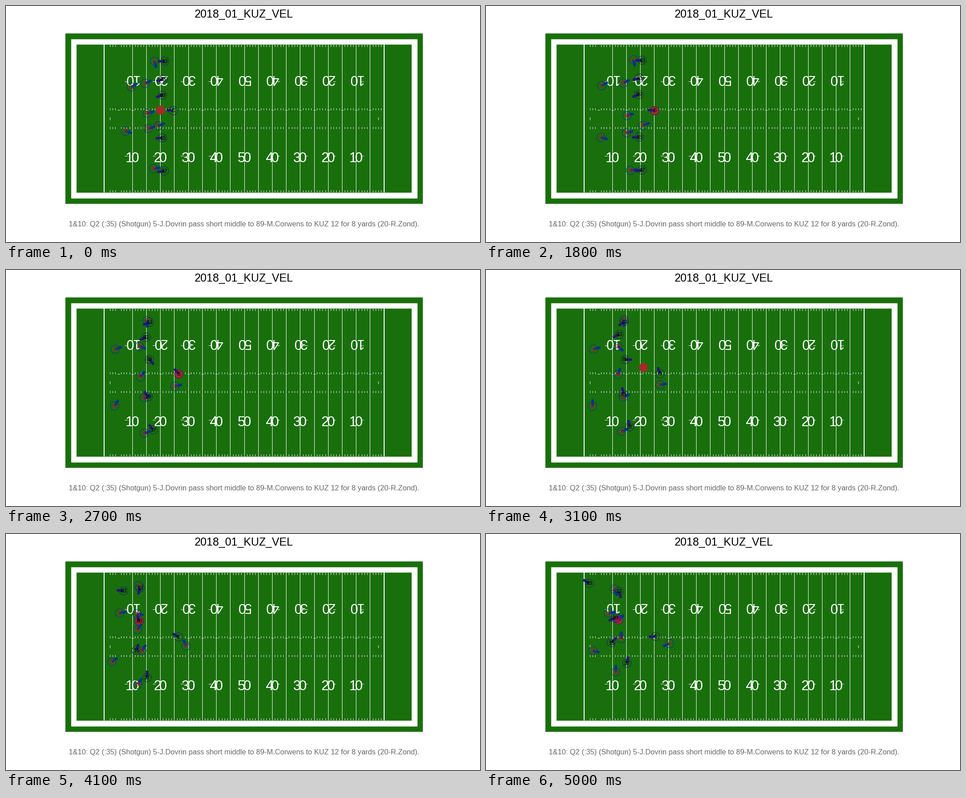
Recreate the animation shown at these times as a matplotlib script. Size 1058 by 529 pixels, loop 5.1 s.

```python
import matplotlib.pyplot as plt
import numpy as np
from matplotlib.animation import FuncAnimation
from matplotlib.patches import Circle, Rectangle

W, H, DPI = 1058, 529, 100
FRAMES, INTERVAL = 51, 100
TURF, BALL_COLOR = "#196f0c", "#a52a2a"
BAR_LENGTH = 15.5

# Phases of the play, in frames.
SNAP, IN_HAND, DROP, THROW, IN_AIR, CATCH, DOWN, END = 8, 16, 18, 28, 31, 35, 44, 50

# The offense holds still until the snap; the defense shifts from the start.
OFFENSE = dict(team="#241773", ink="black", start=SNAP + 2)
DEFENSE = dict(team="#00338d", ink="#c60c30", start=0)

plt.rcParams["font.family"] = "Liberation Sans"
fig = plt.figure(figsize=(W / DPI, H / DPI), dpi=DPI, facecolor="white")
ax = fig.add_axes([0, 0, 1, 1])
ax.set(xlim=(0, W), ylim=(H, 0))
ax.axis("off")


def px(size):
    return size * 72 / DPI


def yard_x(yard):
    return 219.4 + 6.242 * yard


def box(left, top, right, bottom, color):
    ax.add_patch(Rectangle((left + 0.5, top + 0.5), right - left, bottom - top,
                           color=color, lw=0, zorder=1, snap=False))


def line(x0, y0, x1, y1, width=1):
    ax.plot([x0, x1], [y0, y1], color="white", lw=px(width),
            solid_capstyle="butt", zorder=2)


def label(x, y, text, size, color, **options):
    options = dict(ha="center", va="baseline") | options
    return ax.text(x, y, text, fontsize=px(size), color=color, **options)


def draw_field():
    box(132, 61, 930, 443, TURF)
    box(145, 74, 918, 431, "white")
    box(157, 86, 905, 418, TURF)
    for yard in (0, 100):
        line(yard_x(yard), 86, yard_x(yard), 418, 2)
    for yard in range(10, 100, 5):
        line(yard_x(yard), 86, yard_x(yard), 418)
    for yard in range(5, 100, 5):
        line(yard_x(yard) - 2, 233, yard_x(yard) + 3, 233)
    for yard in range(2, 100):
        if yard % 5:
            for top in (87, 229, 271, 413):
                line(yard_x(yard), top, yard_x(yard), top + 4)
    for yard in (2, 98):
        line(yard_x(yard), 249, yard_x(yard), 255)
    for yard in range(10, 100, 10):
        draw_yard_number(yard)


def draw_yard_number(yard):
    x = yard_x(yard)
    tens = str(min(yard, 100 - yard) // 10)
    for baseline, dash_y, flip in ((350, 336, 1), (155, 169, -1)):
        for digit, shift in ((tens, -6.5), ("0", 6.5)):
            label(x + flip * shift, baseline, digit, 31, "white", zorder=3,
                  rotation=90 - 90 * flip, rotation_mode="anchor")
        if yard != 50:
            side = -1 if yard < 50 else 1
            line(x + side * 17, dash_y, x + side * 11, dash_y)


def glide(t, times, points):
    """Smooth curve through the points, starting from rest."""
    t = max(t, times[0])
    slopes = np.gradient(points, times, axis=0)
    slopes[0] = 0
    i = min(np.searchsorted(times, t, side="right"), len(times) - 1) - 1
    span = times[i + 1] - times[i]
    u = (t - times[i]) / span
    ease = u * u * (3 - 2 * u)
    return (points[i] * (1 - ease) + points[i + 1] * ease
            + span * u * (1 - u) * (slopes[i] * (1 - u) - slopes[i + 1] * u))


class Player:
    """Runs a route and turns from its set stance to two later headings."""

    def __init__(self, number, side, route, headings):
        self.times = np.array([side["start"], DROP, IN_AIR, END])
        self.route = np.array(route, float) + 0.5
        self.headings = headings
        self.ring = ax.add_patch(Circle((0, 0), 9.5, fill=False, zorder=5,
                                        ec=side["team"], lw=px(1)))
        self.bar, = ax.plot([], [], color=side["team"], lw=px(5.5),
                            solid_capstyle="butt", zorder=6)
        self.number = label(0, 0, number, 12.5, side["ink"], va="center", zorder=7)

    def position(self, t):
        return glide(t, self.times, self.route)

    def move(self, t):
        x, y = self.position(t)
        angle = np.radians(np.interp(t, (DROP, IN_AIR, END), self.headings))
        self.ring.center = x, y
        self.bar.set_data([x, x + BAR_LENGTH * np.cos(angle)],
                          [y, y - BAR_LENGTH * np.sin(angle)])
        self.number.set_position((x, y + 1))


class Ball:
    """Snapped to the passer, thrown to the receiver, then carried until down."""

    spot = np.array([344.5, 233.5])

    def __init__(self, passer, receiver):
        self.passer, self.receiver = passer, receiver
        self.dot = ax.add_patch(Circle(self.spot, 10, color=BALL_COLOR, lw=0, zorder=4))

    @staticmethod
    def fly(t, start, end, origin, goal):
        return origin + (goal - origin) * np.clip((t - start) / (end - start), 0, 1)

    def move(self, t):
        if t < THROW:
            self.dot.center = self.fly(t, SNAP, IN_HAND, self.spot,
                                       self.passer.position(t))
        else:
            self.dot.center = self.fly(t, THROW, CATCH, self.passer.position(THROW),
                                       self.receiver.position(np.clip(t, CATCH, DOWN)))


draw_field()
label(531, 26, "2018_01_KUZ_VEL", 24.7, "black")
label(531, 494, "1&10: Q2 (:35) (Shotgun) 5-J.Dovrin pass short middle to "
      "89-M.Corwens to KUZ 12 for 8 yards (20-R.Zond).", 16.33, "#666666")

defenders = [
    Player("27", DEFENSE, [(331, 123), (328, 120), (308, 111), (286, 123)], (285, 266, 293)),
    Player("20", DEFENSE, [(310, 173), (306, 172), (294, 171), (291, 187)], (25, -40, 16)),
    Player("21", DEFENSE, [(279, 181), (258, 178), (240, 177), (273, 177)], (30, 15, 11)),
    Player("49", DEFENSE, [(315, 240), (314, 245), (294, 234), (296, 192)], (15, 70, 42)),
    Player("57", DEFENSE, [(339, 268), (350, 267), (388, 257), (409, 245)], (20, 11, 203)),
    Player("58", DEFENSE, [(317, 274), (313, 284), (306, 284), (301, 234)], (15, 20, 90)),
    Player("23", DEFENSE, [(266, 280), (256, 294), (237, 305), (238, 261)], (-15, 90, -15)),
    Player("28", DEFENSE, [(329, 364), (322, 368), (302, 361), (289, 309)], (10, 20, 90)),
]
passer = Player("5", OFFENSE, [(373, 234), (376, 234), (388, 232), (378, 229)], (175, 110, 185))
receiver = Player("89", OFFENSE, [(349, 199), (341, 198), (310, 200), (288, 188)], (200, 360, 561))
blockers = [
    Player("13", OFFENSE, [(354, 123), (348, 121), (308, 115), (296, 128)], (180, 217, 288)),
    Player("83", OFFENSE, [(350, 164), (342, 161), (297, 144), (230, 110)], (195, 205, 150)),
    Player("15", OFFENSE, [(349, 295), (341, 293), (306, 278), (279, 243)], (185, 100, 45)),
    Player("37", OFFENSE, [(353, 369), (348, 367), (320, 351), (314, 289)], (190, 101, 79)),
]
movers = [Ball(passer, receiver), *defenders, passer, receiver, *blockers]


def update(frame):
    for mover in movers:
        mover.move(frame)
    return []


animation = FuncAnimation(fig, update, frames=FRAMES, interval=INTERVAL,
                          repeat=True, repeat_delay=0, blit=False)
plt.show()
```
